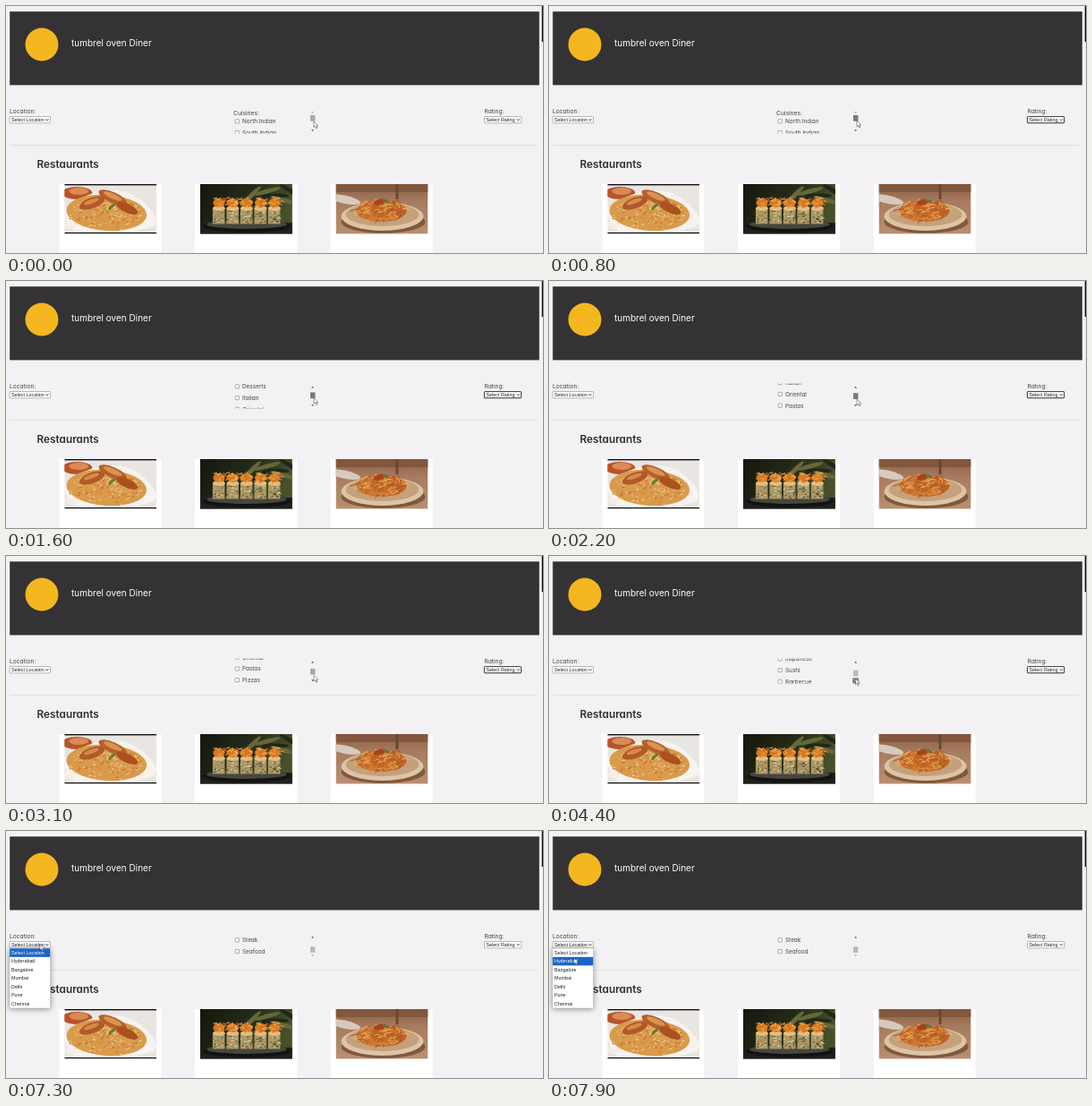
Animation of 600x276 px, one loop 8000 ms. Source, as an HTML page:

```html
<!DOCTYPE html>
<html lang="en">
<head>
<meta charset="utf-8">
<title>Restaurant finder</title>
<style>
  html, body { margin: 0; width: 100%; height: 100%; overflow: hidden; background: #f3f1f3; }
  svg { display: block; width: 100vw; height: 100vh; }
  text { font-family: Inter, sans-serif; font-feature-settings: "cv11"; fill: #454346; }
  .label { font-size: 6.7px; }
  .item { font-size: 6.4px; }
  .control { font-family: "Liberation Sans", sans-serif; font-size: 5.4px; fill: #222; }
  .shadow { filter: drop-shadow(0 1.5px 3px #0006); }
</style>
</head>
<body>
<svg viewBox="0 0 600 276" preserveAspectRatio="none">
  <defs>
    <clipPath id="listClip"><rect x="252" y="114.5" width="96" height="28"/></clipPath>
    <clipPath id="photoClip"><rect width="103" height="55.5"/></clipPath>
    <linearGradient id="wood" x2="0" y2="1">
      <stop stop-color="#8b5f45"/><stop offset=".35" stop-color="#a67b5f"/><stop offset="1" stop-color="#b98f70"/>
    </linearGradient>
    <linearGradient id="leaf" x2="1" y2=".3">
      <stop stop-color="#14170f"/><stop offset=".55" stop-color="#262c18"/><stop offset="1" stop-color="#47502a"/>
    </linearGradient>
  </defs>
  <rect width="600" height="276" fill="#f3f1f3"/>
  <rect x="598.7" width="1.3" height="40" fill="#111"/>
  <rect x="4.2" y="6.2" width="591.6" height="82.2" fill="#343234"/>
  <circle cx="40" cy="43" r="18.5" fill="#f4b71f"/>
  <text x="73" y="45" font-size="10" style="fill:#fff">tumbrel oven Diner</text>
  <text class="label" x="4" y="119.8">Location:</text>
  <text class="label" x="534.5" y="119.8">Rating:</text>
  <g id="selects"></g>
  <rect id="focus" x="534.4" y="123.6" width="41.2" height="7.1" rx=".8" fill="none" stroke="#222" stroke-width=".8"/>
  <g clip-path="url(#listClip)">
    <g id="list"><text class="label" x="254" y="122.3">Cuisines:</text></g>
    <rect id="thumb" x="340" width="5.4" height="6.7"/>
    <rect id="button" x="339.3" y="136.3" width="6.7" height="6.2" fill="#787878"/>
    <path id="up" d="M341.1 119.6h3l-1.5-1.8z"/>
    <path id="down" d="M341.1 138.2h3l-1.5 1.8z"/>
  </g>
  <rect x="4" y="155" width="589" height=".8" fill="#dddbdd"/>
  <text x="34.5" y="181" font-size="11.8" font-weight="600" style="fill:#2e2c30">Restaurants</text>
  <g id="cards"></g>
  <g id="popup">
    <rect class="shadow" x="4" y="131" width="45.5" height="67" rx="1.2" fill="#fff" stroke="#aaa" stroke-width=".4"/>
    <rect id="highlight" x="4.2" width="45.1" height="9.5" fill="#1c65c6"/>
  </g>
  <path id="pointer" d="M0 0v6.6l1.6-1.4 1.1 2.5 1.1-.5-1.1-2.4 2.1-.1z" fill="#fff" stroke="#333" stroke-width=".5"/>
</svg>
<script>
const LOOP = 8000, ROW = 12.7, OPTION = 9.5;
const byId = id => document.getElementById(id);

function add(parent, tag, attrs, text) {
  const node = document.createElementNS('http://www.w3.org/2000/svg', tag);
  for (const key in attrs) node.setAttribute(key, attrs[key]);
  if (text) node.textContent = text;
  return parent.appendChild(node);
}

let seed = 7;
const random = () => (seed = seed * 16807 % 2147483647) / 2147483647;
const pick = colors => colors[Math.floor(random() * colors.length)];

function ellipse(parent, cx, cy, rx, ry, fill, angle = 0) {
  add(parent, 'ellipse', { cx, cy, rx, ry, fill, transform: `rotate(${angle} ${cx} ${cy})` });
}
function block(parent, x, y, width, height, fill) {
  add(parent, 'rect', { x, y, width, height, fill });
}

// Short strokes scattered over an ellipse
function scatter(parent, count, cx, cy, rx, ry, length, colors) {
  for (let i = 0; i < count; i++) {
    const a = random() * Math.PI * 2, r = Math.sqrt(random()), turn = random() * Math.PI;
    const x = cx + Math.cos(a) * r * rx, y = cy + Math.sin(a) * r * ry;
    add(parent, 'path', {
      d: `M${x} ${y}q${length / 2} ${-length / 3} ${Math.cos(turn) * length} ${Math.sin(turn) * length / 2}`,
      fill: 'none', stroke: pick(colors), 'stroke-width': 0.9
    });
  }
}

function riceDish(g) {
  block(g, 0, 0, 103, 56, '#e9e5e1');
  ellipse(g, 14, 10, 17, 7, '#b9532b');
  ellipse(g, 16, 8, 11, 4, '#d98b55');
  add(g, 'path', { d: 'M0 28Q24 8 52 7T99 32Q107 44 97 48L70 55H14Q0 46 0 28z', fill: '#f7f3ee' });
  ellipse(g, 47, 32, 45, 20, '#d99a4c', 4);
  scatter(g, 170, 47, 34, 43, 18, 3, ['#f0cc8a', '#e2a04a', '#b9622a', '#f6e2b4', '#c9772f']);
  ellipse(g, 31, 21, 15, 6, '#b0592a', -20);
  ellipse(g, 54, 15, 17, 6, '#b4602c', 24);
  ellipse(g, 54, 13.5, 11, 3, '#db9350', 24);
  ellipse(g, 70, 27, 13, 5, '#a9511f', 25);
  ellipse(g, 30, 19.5, 9, 2.5, '#d58a4a', -20);
  ellipse(g, 53, 25, 5, 1.6, '#5e7d35', -40);
  ellipse(g, 6, 47, 6, 3, '#f3ede4', 20);
  block(g, 0, 0, 103, 1.4, '#111');
  block(g, 0, 54, 103, 1.5, '#111');
}

function sushiDish(g) {
  block(g, 0, 0, 103, 56, 'url(#leaf)');
  for (let i = 0; i < 7; i++) ellipse(g, 48 + i * 9, 8 + i % 3 * 5, 15, 2.6, i % 2 ? '#66683a' : '#20271a', -60 + i * 15);
  block(g, 0, 43, 103, 13, '#1f201d');
  ellipse(g, 52, 47, 49, 7, '#121413');
  ellipse(g, 52, 45, 45, 5, '#45463f');
  for (let x = 21; x < 90; x += 15.5) {
    block(g, x - 7, 27, 13.5, 17.5, '#a89a68');
    scatter(g, 24, x, 36, 6.5, 8, 2.5, ['#efe6cf', '#4f5429', '#d0702c', '#37391f']);
    ellipse(g, x, 27, 7, 3, '#e4bd80');
    ellipse(g, x, 21, 6.5, 5, '#d47a24');
    scatter(g, 20, x, 20, 8, 6, 4, ['#f29b35', '#dc6c19', '#f7b65c']);
  }
}

function pastaDish(g) {
  block(g, 0, 0, 103, 56, 'url(#wood)');
  block(g, 0, 0, 103, 9, '#83573e');
  ellipse(g, 9, 17, 19, 4.5, '#d8c9bc', 12);
  block(g, 67, 0, 3, 17, '#6c4632');
  ellipse(g, 53, 42, 47, 13, '#80583f');
  ellipse(g, 52, 36, 46, 16, '#ddc4a5');
  ellipse(g, 52, 34, 41, 13, '#c4a17c');
  ellipse(g, 51, 30, 28, 12, '#bd6527');
  scatter(g, 95, 50, 29, 27, 12, 8, ['#e39a4b', '#a84e1c', '#efb466', '#d27a2f']);
  ellipse(g, 49, 20, 7, 3, '#a5431f', -15);
  ellipse(g, 56, 19, 4, 1.6, '#68743a', 20);
}

[riceDish, sushiDish, pastaDish].forEach((draw, i) => {
  const card = add(byId('cards'), 'g', { transform: `translate(${59.5 + i * 151.6} 199)` });
  block(card, 0, 0, 114, 77, '#fff');
  draw(add(card, 'g', { transform: 'translate(5.8 0)', 'clip-path': 'url(#photoClip)' }));
});

[[4, 45.5, 'Select Location'], [534.5, 41.3, 'Select Rating']].forEach(([x, width, text]) => {
  const group = byId('selects');
  add(group, 'rect', { x, y: 123.5, width, height: 7.3, rx: 0.6, fill: '#fff', stroke: '#767676', 'stroke-width': 0.5 });
  add(group, 'text', { class: 'control', x: x + 2, y: 129.1 }, text);
  add(group, 'path', { d: `M${x + width - 5} 126.3l1.5 1.6 1.5-1.6`, fill: 'none', stroke: '#111', 'stroke-width': 0.8 });
});

['North Indian', 'South Indian', 'Chinese', 'Desserts', 'Italian', 'Oriental', 'Pastas', 'Pizzas',
  'Japanese', 'Sushi', 'Barbecue', 'Steak', 'Seafood'].forEach((name, i) => {
  const y = 129 + i * ROW;
  add(byId('list'), 'rect', { x: 256.2, y: y - 2.2, width: 4.2, height: 4.2, rx: 0.4, fill: '#fff', stroke: '#767676', 'stroke-width': 0.6 });
  add(byId('list'), 'text', { class: 'item', x: 264, y: y + 2.3 }, name);
});

const options = ['Select Location', 'Hyderabad', 'Bangalore', 'Mumbai', 'Delhi', 'Pune', 'Chennai']
  .map((name, i) => add(byId('popup'), 'text', { class: 'control', x: 6, y: 137.9 + i * OPTION }, name));

// Rows of [time, value, ...]
const scrollSteps = [[900, 0], [1600, 49.1], [2200, 66], [2800, 79.2], [3500, 79.2], [3600, 91.4], [3900, 91.4],
  [4000, 103.5], [4200, 103.5], [4300, 115.6], [4500, 115.6], [4600, 127.7], [4800, 139.8], [4900, 139.8], [5000, 146.7]];
const pointerSteps = [[0, 344, 129], [500, 344, 128.3], [900, 344, 128.3], [1600, 344, 130.6], [2800, 344, 133.5],
  [3100, 344, 133.5], [3400, 342.5, 137], [6000, 342.5, 137], [6100, 301.5, 133], [6400, 130, 130],
  [6700, 50, 127], [6900, 40, 126.5], [7000, 38, 126.5], [7500, 38, 126.5], [7600, 36, 131], [7800, 29, 142], [7900, 28, 142]];

function sample(steps, t) {
  const next = steps.findIndex(step => step[0] > t);
  if (next < 0) return steps[steps.length - 1].slice(1);
  if (next === 0) return steps[0].slice(1);
  const a = steps[next - 1], b = steps[next], k = (t - a[0]) / (b[0] - a[0]);
  return a.slice(1).map((v, i) => v + (b[i + 1] - v) * k);
}

const show = (id, on) => byId(id).setAttribute('visibility', on ? 'visible' : 'hidden');
const set = (id, name, value) => byId(id).setAttribute(name, value);

function render(t) {
  const [scroll] = sample(scrollSteps, t), [x, y] = sample(pointerSteps, t);
  const pressed = t >= 3500 && t < 5000, open = t >= 7300;
  set('list', 'transform', `translate(0 ${-scroll})`);
  set('thumb', 'y', 122 + scroll / 146.7 * 7.2);
  set('thumb', 'fill', t >= 500 && t < 3000 ? '#787878' : t < 3400 ? '#a8a8a8' : '#b9b9b9');
  set('up', 'fill', scroll > 0 ? '#505050' : '#a3a3a3');
  set('down', 'fill', pressed ? '#fff' : scroll < 146 ? '#505050' : '#a3a3a3');
  show('button', pressed);
  show('focus', t >= 500 && !open);
  show('popup', open);
  const active = Math.max(0, Math.floor((y - 131.5) / OPTION));
  set('highlight', 'y', 131.3 + active * OPTION);
  options.forEach((option, i) => option.style.fill = i === active ? '#fff' : '#222');
  set('pointer', 'transform', `translate(${x} ${y})`);
}

const start = performance.now();
function tick() {
  const t = (performance.now() - start) % LOOP;
  render(Math.floor(t / 100) * 100);
  requestAnimationFrame(tick);
}
tick();
</script>
</body>
</html>
```
